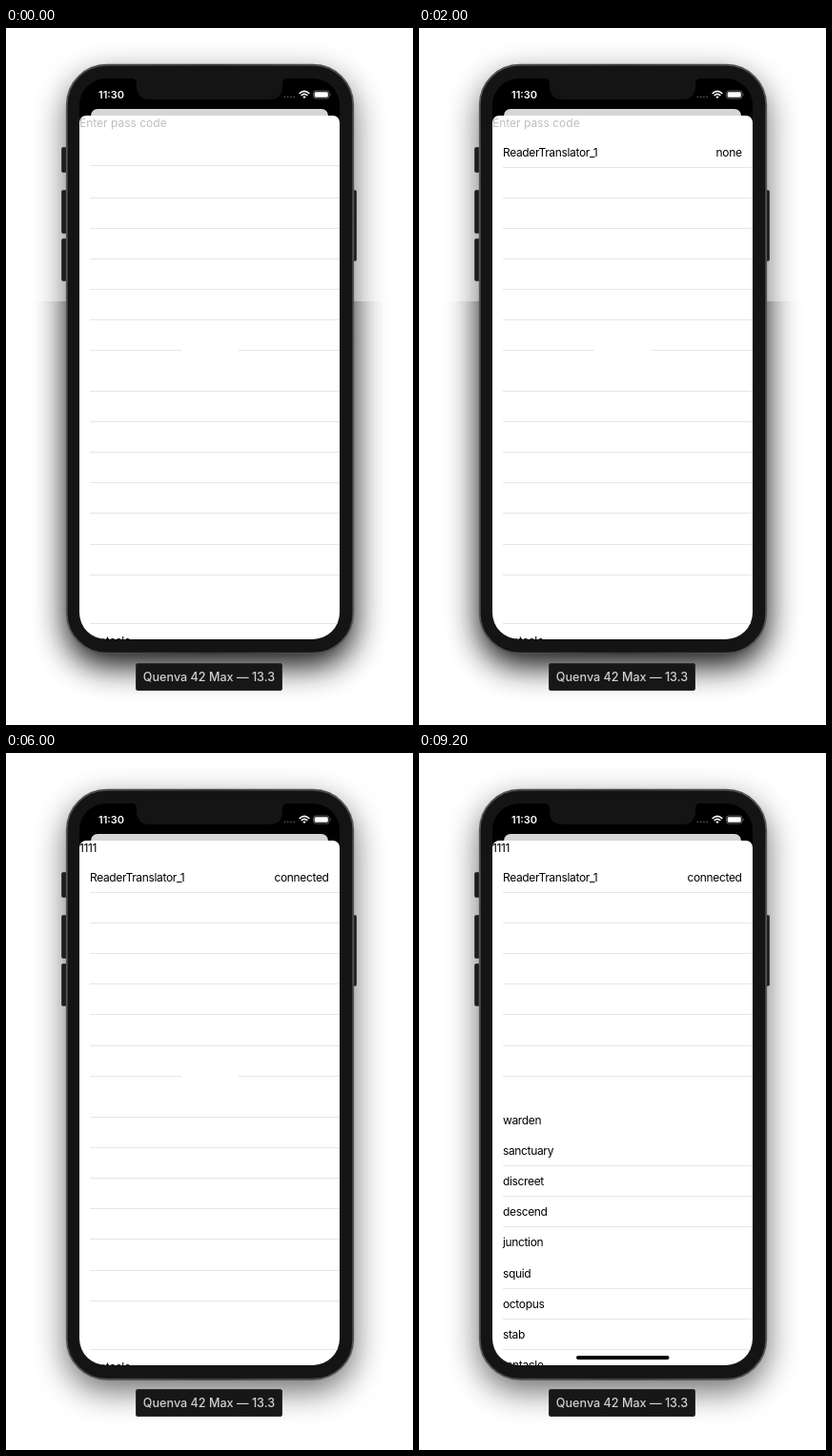
Recreate the animation shown at these times as an HTML page. Size 427 by 732 pixels, loop 10 s.

```html
<!DOCTYPE html>
<html lang="en">
<head>
<meta charset="utf-8">
<title>Pass code pairing</title>
<style>
  html, body { margin: 0; width: 100%; height: 100%; overflow: hidden; background: #fff; }
  svg { display: block; width: 427px; height: 732px; }
  text { font-family: Inter, Roboto, sans-serif; }
  .list text { font-size: 12px; letter-spacing: -0.35px; fill: #000; }
  .list .hint { fill: #bebec0; letter-spacing: 0; }
  .end { text-anchor: end; }
</style>
</head>
<body>
<svg viewBox="0 0 427 732">
  <defs>
    <filter id="blur" filterUnits="userSpaceOnUse" x="-60" y="-60" width="550" height="860">
      <feGaussianBlur stdDeviation="17"/>
    </filter>
    <clipPath id="upper"><rect id="upperBox" width="427" height="287"/></clipPath>
    <clipPath id="lower"><rect id="lowerBox" y="287" width="427" height="445"/></clipPath>
    <clipPath id="screen"><rect id="screenBox" x="77" y="53" width="273" height="589" rx="28"/></clipPath>
    <linearGradient id="rim" x2="1" y2="0">
      <stop offset="0" stop-color="#555"/>
      <stop offset=".5" stop-color="#3c3c3c"/>
      <stop offset="1" stop-color="#555"/>
    </linearGradient>
  </defs>

  <g clip-path="url(#upper)">
    <rect x="63" y="50" width="302" height="620" rx="43" opacity=".58" filter="url(#blur)"/>
  </g>
  <g clip-path="url(#lower)">
    <rect id="shade" x="63" y="50" width="302" height="620" rx="43" filter="url(#blur)"/>
  </g>

  <g fill="#1d1d1d" stroke="#3d3d3d">
    <rect x="58.5" y="125.5" width="6" height="26" rx="1.5"/>
    <rect x="58.5" y="170.5" width="6" height="45" rx="1.5"/>
    <rect x="58.5" y="221.5" width="6" height="44" rx="1.5"/>
    <rect x="362.5" y="170.5" width="5" height="74" rx="1.5"/>
  </g>
  <rect id="body" x="63.75" y="38.75" width="300.5" height="618" rx="42" fill="#141414" stroke="url(#rim)" stroke-width="1.8"/>

  <g clip-path="url(#screen)">
    <rect x="77" y="53" width="273" height="590"/>
    <rect x="89" y="85" width="249" height="30" rx="7" fill="#d6d6d6"/>
    <rect x="77" y="92" width="273" height="570" rx="7" fill="#fff"/>
    <g class="list">
      <g id="lines" fill="#e6e6e7"></g>
      <text id="code" x="77" y="104"></text>
      <g id="device">
        <text x="88" y="134.5">ReaderTranslator_1</text>
        <text id="status" class="end" x="338.6" y="134.5"></text>
      </g>
      <g id="words"></g>
      <text id="last" x="88">tentacle</text>
    </g>
    <rect id="home" x="165" y="633" width="97.5" height="4" rx="2"/>
  </g>

  <path d="M131 52 Q137 53 137 59 V61 Q137 75 151 75 H276 Q290 75 290 61 V59 Q290 53 296 52Z" fill="#141414"/>
  <text x="97" y="73.5" font-size="11" font-weight="600" fill="#fff">11:30</text>
  <g fill="#555">
    <circle cx="292.5" cy="72.3" r=".9"/><circle cx="295.7" cy="72.3" r=".9"/>
    <circle cx="298.9" cy="72.3" r=".9"/><circle cx="302.1" cy="72.3" r=".9"/>
  </g>
  <g fill="none" stroke="#fff" stroke-width="1.7">
    <path d="M307.7 69 Q313 63.8 318.3 69M309.7 71 Q313 67.8 316.3 71"/>
    <path d="M311.3 72.2 Q313 70.7 314.7 72.2 L313 74Z" fill="#fff" stroke="none"/>
  </g>
  <rect x="322.5" y="66" width="16.5" height="8" rx="2.4" fill="none" stroke="#777" stroke-width=".8"/>
  <rect x="323.7" y="67.2" width="14.1" height="5.6" rx="1.4" fill="#fff"/>
  <path d="M340.2 68.6 Q341.6 70 340.2 71.4Z" fill="#777"/>

  <g id="label">
    <rect x="136" y="667" width="154" height="29" rx="3" fill="#171717"/>
    <rect x="136.5" y="667.5" width="153" height="28" rx="2.5" fill="none" stroke="#2c2c2c"/>
    <text x="213" y="686" font-size="12.6" font-weight="500" fill="#d0d0d0" text-anchor="middle">Quenva 42 Max — 13.3</text>
  </g>
</svg>
<script>
const $ = id => document.getElementById(id);
const set = (id, attrs) => {
  for (const key in attrs) $(id).setAttribute(key, attrs[key]);
};
const show = (id, on) => set(id, { visibility: on ? "visible" : "hidden" });

const LOOP = 10000, STEP = 2000;
const steps = [
  { first: 144 },
  { first: 146, status: "none" },
  { first: 146, status: "none", code: "1111", shift: 1 },
  { first: 146, status: "connected", code: "1111", shift: 1, calm: true },
  { first: 146, status: "connected", code: "1111", shift: 1, calm: true, loaded: true }
];
const topLines = [178, 210, 242, 274, 306, 338];
const emptyLines = [381, 413, 445, 477, 509, 542, 574, 625];
const wordLines = [432, 464, 496, 561, 593, 625];
const words = ["warden", "sanctuary", "discreet", "descend", "junction", "squid", "octopus", "stab"];

$("words").innerHTML = words
  .map((word, i) => `<text x="88" y="${389.5 + 32.2 * i}">${word}</text>`).join("");

const line = (y, x = 88, end = 350) =>
  `<rect x="${x}" y="${y}" width="${end - x}" height="1"/>`;

function drawLines({ first, shift = 0, loaded }) {
  const all = [...topLines, ...(loaded ? wordLines : emptyLines)];
  return line(first) + all.map(y => {
    const top = y > 287 ? y + shift : y;
    return y === 338 && !loaded ? line(top, 88, 184) + line(top, 244) : line(top);
  }).join("");
}

function render(step) {
  const { status = "", code, shift = 0, calm, loaded } = step;
  const seam = 287 + shift;
  set("upperBox", { height: seam });
  set("lowerBox", { y: seam, height: 732 - seam });
  set("shade", { opacity: calm ? 0.58 : 0.95 });
  set("body", { height: 618 + shift });
  set("screenBox", { height: 589 + shift });
  set("label", { transform: `translate(0 ${shift})` });
  set("code", { class: code ? "" : "hint" });
  set("last", { y: loaded ? 647 : 647.5 + shift });
  $("code").textContent = code || "Enter pass code";
  $("status").textContent = status;
  $("lines").innerHTML = drawLines(step);
  show("device", status);
  show("words", loaded);
  show("home", loaded);
}

const start = performance.now();
let current = -1;
function tick() {
  const time = (performance.now() - start) % LOOP;
  const index = Math.floor(time / STEP);
  if (index !== current) render(steps[current = index]);
  requestAnimationFrame(tick);
}
tick();
</script>
</body>
</html>
```
